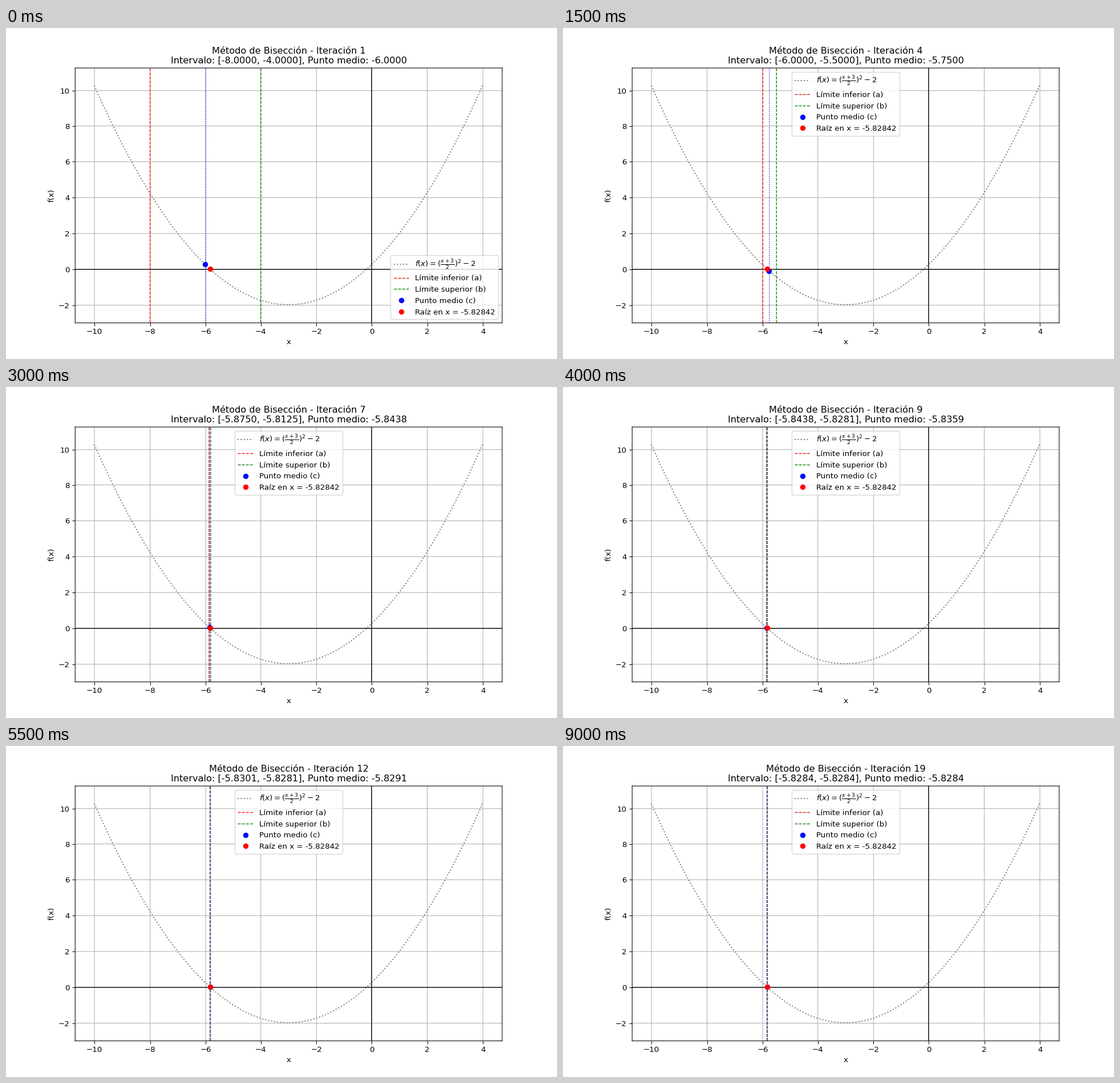
A matplotlib script that plays this animation: 966x580 px, repeating every 9.5 s.

```python
import numpy as np
import matplotlib.pyplot as plt
from matplotlib.animation import FuncAnimation

STEPS = 19
STEP_MS = 500
START = (-8.0, -4.0)
ROOT = -5.82842

# Layout grid, and the axes' left, bottom, width and height on it
GRID_W, GRID_H = 1000, 600
LEFT, BOTTOM, WIDTH, HEIGHT = 125, 66, 775, 462


def f(x):
    return ((x + 3) / 2) ** 2 - 2


def bisect(a, b, steps):
    """Return the (a, b, midpoint) triple of every iteration."""
    history = []
    for _ in range(steps):
        c = (a + b) / 2
        history.append((a, b, c))
        if f(a) * f(c) < 0:
            b = c
        else:
            a = c
    return history


history = bisect(*START, STEPS)
x = np.linspace(-10, 4, 400)
y = f(x)
x_min, x_max = -10.7, 4.7
y_min, y_max = y.min() - 1, y.max() + 1
dx = (x_max - x_min) / WIDTH
dy = (y_max - y_min) / HEIGHT


def cell_x(v):
    """Centre of the grid column that holds v."""
    return x_min + (np.floor((v - x_min) / dx + 0.5) + 0.5) * dx


def cell_y(v):
    """Centre of the grid row that holds v."""
    return y_min + (np.ceil((v - y_min) / dy - 0.5) - 0.5) * dy


def tick_labels(values):
    return [str(v).replace("-", "\N{MINUS SIGN}") for v in values]


fig = plt.figure(figsize=(10, 6.00415), dpi=96.6)
# The frame runs through cell centres, so the limits shift by half a cell
ax = fig.add_axes([(LEFT + 0.5) / GRID_W, (BOTTOM - 0.5) / GRID_H,
                   WIDTH / GRID_W, HEIGHT / GRID_H])

ax.plot(x, y, ":", color="gray", label=r"$f(x) = (\frac{x+3}{2})^2 - 2$")
ax.axhline(cell_y(0), color="black", linewidth=1)
ax.axvline(cell_x(0), color="black", linewidth=1)
line_a = ax.axvline(0, color="red", linestyle="--", linewidth=1,
                    label="Límite inferior (a)")
line_b = ax.axvline(0, color="green", linestyle="--", linewidth=1,
                    label="Límite superior (b)")
line_c = ax.axvline(0, color="blue", linestyle=":", linewidth=1)
dot_c, = ax.plot([0], [0], "o", color="blue", label="Punto medio (c)")
ax.plot([ROOT], [0], "o", color="red", label=f"Raíz en x = {ROOT}")

x_ticks = np.arange(-10, 5, 2)
y_ticks = np.arange(-2, 11, 2)
ax.set_xticks(cell_x(x_ticks), tick_labels(x_ticks))
ax.set_yticks(cell_y(y_ticks), tick_labels(y_ticks))
ax.set_xlim(x_min + dx / 2, x_max + dx / 2)
ax.set_ylim(y_min - dy / 2, y_max - dy / 2)
ax.set_xlabel("x")
ax.set_ylabel("f(x)")
ax.grid(True)
for artist in [*ax.lines, *ax.spines.values(),
               *ax.get_xgridlines(), *ax.get_ygridlines()]:
    artist.set_snap(False)
# "best" moves the legend away from the lines on every draw
ax.legend(loc="best")


def update(i):
    a, b, c = history[i]
    for line, pos in ((line_a, a), (line_b, b), (line_c, c)):
        line.set_xdata([cell_x(pos)] * 2)
    dot_c.set_data([c], [f(c)])
    ax.set_title(f"Método de Bisección - Iteración {i + 1}\n"
                 f"Intervalo: [{a:.4f}, {b:.4f}], Punto medio: {c:.4f}")


anim = FuncAnimation(fig, update, frames=STEPS, interval=STEP_MS,
                     repeat=True, repeat_delay=0)
plt.show()
```
